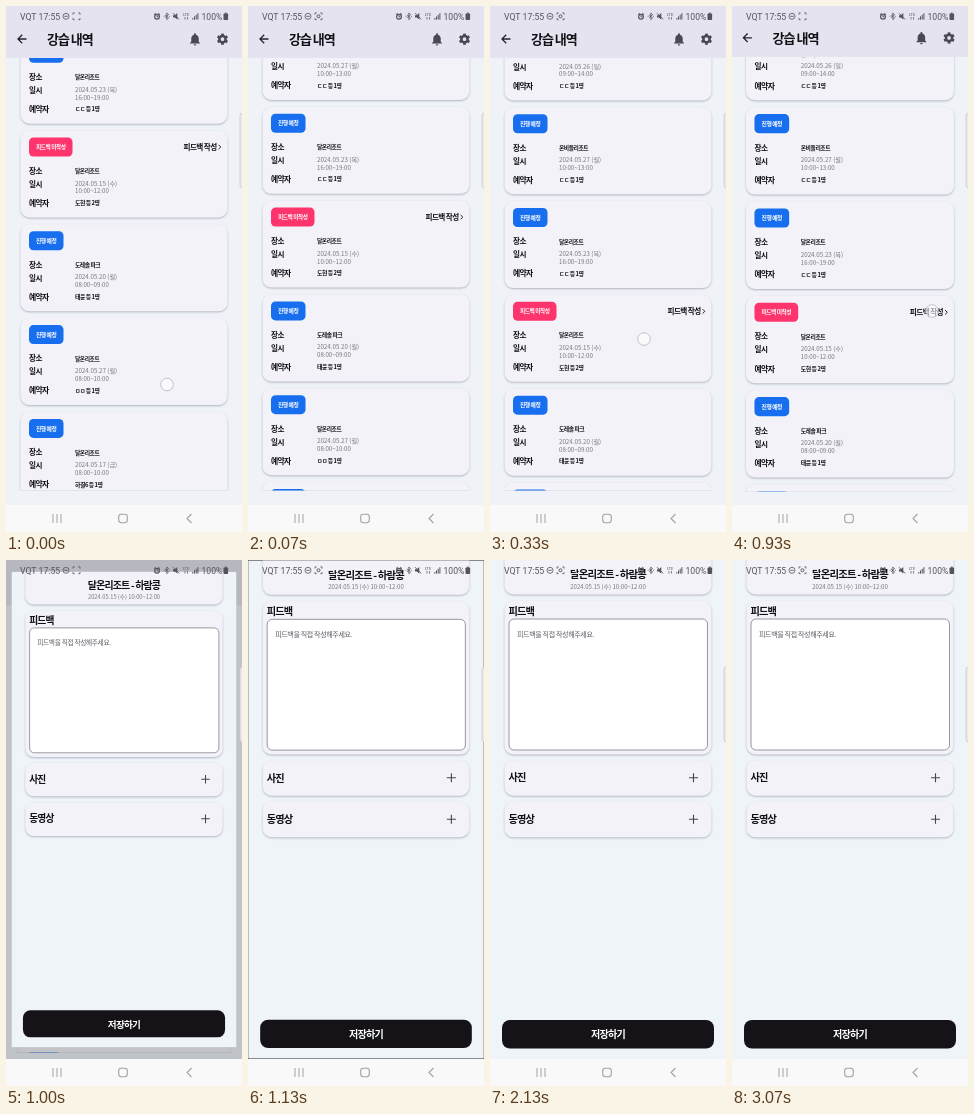
An HTML page with a canvas for the animation above (3190 ms loop, 236x526 px).

```html
<!DOCTYPE html>
<html lang="ko">
<head>
<meta charset="utf-8">
<title>강습 내역</title>
<style>
  html, body { margin: 0; width: 100%; height: 100%; overflow: hidden; background: #eff3f8; }
  canvas { display: block; width: 236px; height: 526px; }
</style>
</head>
<body>
<canvas id="stage"></canvas>
<script>
const W = 236, H = 526, VIEW_H = 499;
const LOOP = 3190, TICK = 1000 / 15;
const OPEN_AT = 917, OPEN_TIME = 300;
const PITCH = 93.8;
const KOREAN = '"Noto Sans CJK KR", "Noto Sans CJK", sans-serif';
const INK = '#111014', ICON = '#4a4852', PAGE = '#eff3f8', CARD = '#f3f2f8';

const lessons = [
  { place: '달온리조트', date: '2024.05.26 (일)', time: '09:00~14:00', who: 'ㄷㄷ 등 1명' },
  { place: '온비들리조트', date: '2024.05.27 (월)', time: '10:00~13:00', who: 'ㄷㄷ 등 1명' },
  { place: '달온리조트', date: '2024.05.23 (목)', time: '16:00~19:00', who: 'ㄷㄷ 등 1명' },
  { place: '달온리조트', date: '2024.05.15 (수)', time: '10:00~12:00', who: '도현 등 2명', feedback: true },
  { place: '도레솔 파크', date: '2024.05.20 (월)', time: '08:00~09:00', who: '태윤 등 1명' },
  { place: '달온리조트', date: '2024.05.27 (월)', time: '08:00~10:00', who: 'ㅁㅁ 등 1명' },
  { place: '달온리조트', date: '2024.05.17 (금)', time: '08:00~10:00', who: '하결6 등 1명' }
];

const canvas = document.getElementById('stage');
const ctx = canvas.getContext('2d');
const dpr = window.devicePixelRatio || 1;
canvas.width = W * dpr;
canvas.height = H * dpr;

const clamp = v => Math.max(0, Math.min(1, v));

function bezier(x1, y1, x2, y2) {
  const at = (a, b, s) => 3 * (1 - s) ** 2 * s * a + 3 * (1 - s) * s * s * b + s ** 3;
  return x => {
    let lo = 0, hi = 1;
    for (let i = 0; i < 24; i++) {
      const mid = (lo + hi) / 2;
      if (at(x1, x2, mid) < x) lo = mid; else hi = mid;
    }
    return at(y1, y2, lo);
  };
}
const launch = bezier(0.05, 0, 0.1333, 0.06);
const settle = bezier(0.2083, 0.82, 0.25, 1);
const zoomEase = u => u < 1 / 6 ? 0.4 * launch(u * 6) : 0.4 + 0.6 * settle((u - 1 / 6) * 1.2);

function text(str, x, y, size, { color = INK, weight = 900, spacing = -0.08, align = 'left', font = KOREAN } = {}) {
  ctx.font = `${weight} ${size}px ${font}`;
  ctx.letterSpacing = `${size * spacing}px`;
  ctx.textAlign = align;
  ctx.fillStyle = color;
  ctx.fillText(str, x, y + size * 0.37);
}

function box(x, y, w, h, r, fill, stroke, width = 1) {
  ctx.beginPath();
  ctx.roundRect(x, y, w, h, r);
  if (fill) { ctx.fillStyle = fill; ctx.fill(); }
  if (stroke) { ctx.strokeStyle = stroke; ctx.lineWidth = width; ctx.stroke(); }
}

// Each argument after width is a polyline: [x, y, x, y, ...]
function lines(color, width, ...paths) {
  ctx.beginPath();
  for (const p of paths)
    for (let i = 0; i < p.length; i += 2) ctx[i ? 'lineTo' : 'moveTo'](p[i], p[i + 1]);
  ctx.strokeStyle = color;
  ctx.lineWidth = width;
  ctx.stroke();
}

function circle(x, y, r, fill, stroke, width = 1) {
  box(x - r, y - r, 2 * r, 2 * r, r, fill, stroke, width);
}

function card(y, h) {
  ctx.save();
  ctx.shadowColor = 'rgba(90, 90, 115, 0.4)';
  ctx.shadowBlur = 2 * dpr;
  ctx.shadowOffsetY = dpr;
  box(14.5, y, 207, h, 9, CARD);
  ctx.restore();
}

function lessonCard(lesson, y) {
  const gray = { color: '#777680', weight: 400, spacing: 0 };
  card(y - 16.5, 87);
  if (lesson.feedback) {
    box(23, y - 9.5, 43.5, 19, 4.5, '#fd356c');
    text('피드백 미작성', 30, y, 5.7, { color: '#fff' });
    text('피드백 작성', 177.5, y, 7.6);
    lines(INK, 0.9, [212.6, y - 2.2, 214.8, y, 212.6, y + 2.2]);
  } else {
    box(23, y - 9.5, 34.5, 19, 4.5, '#176eee');
    text('진행 예정', 30, y, 5.8, { color: '#fff' });
  }
  text('장소', 23, y + 24, 7.6);
  text(lesson.place, 69, y + 24, 5.8);
  text('일시', 23, y + 37, 7.6);
  text(lesson.date, 69, y + 36.3, 6.2, gray);
  text(lesson.time, 69, y + 44.2, 6.1, gray);
  text('예약자', 23, y + 56, 7.8);
  text(lesson.who, 69, y + 56, 5.9);
}

const bell = new Path2D('M12 22c1.1 0 2-.9 2-2h-4c0 1.1.9 2 2 2zm6-6v-5c0-3.1-1.6-5.6-4.5-6.3V4c0-.8-.7-1.5-1.5-1.5s-1.5.7-1.5 1.5v.7C7.6 5.4 6 7.9 6 11v5l-2 2v1h16v-1z');

function header() {
  ctx.fillStyle = '#e4e3ef';
  ctx.fillRect(0, 0, W, 52);
  lines('#25232a', 1.3, [20.5, 33, 12, 33], [16.2, 28.8, 12, 33, 16.2, 37.2]);
  text('강습 내역', 41, 33, 13);

  ctx.save();
  ctx.translate(189 - 12 * 0.62, 33.3 - 12.2 * 0.62);
  ctx.scale(0.62, 0.62);
  ctx.fillStyle = ICON;
  ctx.fill(bell);
  ctx.restore();

  circle(216.5, 33.2, 3.1, null, ICON, 2.5);
  for (let i = 0; i < 6; i++) {
    const a = (i + 0.5) * Math.PI / 3, c = Math.cos(a), s = Math.sin(a);
    lines(ICON, 2.7, [216.5 + 3.4 * c, 33.2 + 3.4 * s, 216.5 + 5.6 * c, 33.2 + 5.6 * s]);
  }
}

function listPage(t) {
  ctx.fillStyle = PAGE;
  ctx.fillRect(0, 0, W, VIEW_H);
  const scroll = 1 - (1 - clamp(t / 396)) ** 3;
  const anchor = 141 + 165 * scroll;
  ctx.save();
  ctx.beginPath();
  ctx.rect(0, 52, W, 432.5);
  ctx.clip();
  lessons.forEach((lesson, i) => lessonCard(lesson, anchor + (i - 3) * PITCH));
  ctx.restore();
  header();
}

function attachRow(label, y) {
  card(y - 17.5, 35.5);
  text(label, 18.5, y, 10.2);
  lines('#45434b', 1.1, [199, y, 208, y], [203.5, y - 4.5, 203.5, y + 4.5]);
}

function feedbackPage() {
  ctx.fillStyle = '#eff4f9';
  ctx.fillRect(0, 0, W, VIEW_H);
  card(-20, 54.5);
  text('달온리조트 - 하람콩', 118, 14.5, 10.4, { align: 'center' });
  text('2024.05.15 (수) 10:00~12:00', 118, 26.5, 6, { color: '#77757e', weight: 500, spacing: 0, align: 'center' });
  card(41, 153.5);
  text('피드백', 18.5, 51, 10.2);
  box(19, 59, 198.5, 131, 5, '#fff', '#8e8c94', 0.9);
  text('피드백을 직접 작성해주세요.', 27, 74, 7, { color: '#5c5a62', weight: 400, spacing: -0.05 });
  attachRow('사진', 217.7);
  attachRow('동영상', 259.3);
  box(12, 460, 212, 28.5, 8, '#151318');
  text('저장하기', 118, 474.5, 10.1, { color: '#fff', align: 'center' });
}

function zoomed(scale, draw) {
  ctx.save();
  ctx.translate(W / 2, VIEW_H / 2);
  ctx.scale(scale, scale);
  ctx.translate(-W / 2, -VIEW_H / 2);
  ctx.beginPath();
  ctx.rect(0, 0, W, VIEW_H);
  ctx.clip();
  draw();
  ctx.restore();
}

function statusBar(t) {
  const color = '#55545b';
  const roman = { color, weight: 400, spacing: 0, font: 'Roboto, sans-serif' };
  text('VQT 17:55', 14, 10.5, 8.7, roman);
  circle(60, 10.3, 3, null, color, 0.8);
  lines(color, 0.9, [58.3, 10.3, 61.7, 10.3]);

  for (const sx of [-1, 1])
    for (const sy of [-1, 1])
      lines(color, 0.8, [70.5 + sx * 1.8, 10.3 + sy * 3.4, 70.5 + sx * 3.5, 10.3 + sy * 3.4, 70.5 + sx * 3.5, 10.3 + sy * 1.7]);
  if ((t + 940) % 1000 < 460) circle(70.5, 10.3, 1.5, null, color, 1);

  circle(151, 10.7, 2.4, null, color, 1.2);
  lines(color, 1, [148, 8.6, 149.8, 7.2], [152.2, 7.2, 154, 8.6], [151, 9.3, 151, 10.8, 152.3, 10.8]);
  lines(color, 0.8, [159, 8.8, 162.6, 12, 160.8, 13.6, 160.8, 7, 162.6, 8.6, 159, 11.8], [157.7, 10.3, 158.6, 10.3], [163, 10.3, 163.9, 10.3]);
  ctx.beginPath();
  ctx.moveTo(167, 9.2); ctx.lineTo(168.8, 9.2); ctx.lineTo(171.3, 7);
  ctx.lineTo(171.3, 13.6); ctx.lineTo(168.8, 11.6); ctx.lineTo(167, 11.6);
  ctx.fillStyle = color;
  ctx.fill();
  lines(color, 0.9, [167, 7.2, 173.2, 13.4]);
  text('LTE', 177, 8.6, 4, roman);
  lines(color, 0.7, [179, 11, 179, 13.6], [181.5, 11, 181.5, 13.6]);
  for (let i = 0; i < 4; i++) lines(color, 1, [186.8 + i * 1.7, 13.6, 186.8 + i * 1.7, 12 - i * 1.6]);
  text('100%', 195.5, 10.5, 8.6, roman);
  box(217.5, 7.4, 4.6, 6.6, 0.8, color);
  box(218.9, 6.6, 1.8, 1.2, 0, color);
}

function navBar() {
  const gray = '#a3a3a6';
  ctx.fillStyle = '#f9f9fa';
  ctx.fillRect(0, VIEW_H, W, H - VIEW_H);
  for (const x of [47, 51, 55]) lines(gray, 1, [x, 508, x, 517]);
  box(112.7, 508.3, 8.6, 8.4, 2.6, null, gray, 1.1);
  lines(gray, 1.1, [185.5, 508, 181, 512.5, 185.5, 517]);
}

function touch(t) {
  let point;
  if (t < 60) point = [161, 378.5];
  else if (t > 180 && t < 480) {
    const drag = clamp((t - 200) / 133);
    point = [155 - drag, 323 + 10 * drag];
  } else if (t > 850 && t < 960) point = [200, 305];
  if (point) circle(...point, 6.3, 'rgba(255, 255, 255, 0.6)', '#bbbac6', 0.9);
}

function render(t) {
  const u = clamp((t - OPEN_AT) / OPEN_TIME);
  const zoom = zoomEase(u);
  ctx.setTransform(dpr, 0, 0, dpr, 0, 0);
  ctx.save();
  ctx.beginPath();
  ctx.rect(0, 0, W, VIEW_H);
  ctx.clip();
  if (u < 1) zoomed(1 + 0.05 * zoom, () => listPage(t));
  ctx.fillStyle = `rgba(0, 0, 0, ${0.6 * clamp((u - 0.2075) / 0.21)})`;
  ctx.fillRect(0, 0, W, VIEW_H);
  if (u > 0.2) zoomed(u < 1 ? 0.85 + 0.15 * zoom : 1, feedbackPage);
  ctx.restore();

  statusBar(t);
  navBar();
  box(234, 107, 8, 75, 2.5, '#e9e9ed', '#c9c9d0', 0.8);
  touch(t);
}

const start = performance.now();
function frame() {
  const t = (performance.now() - start) % LOOP;
  render(Math.floor((t + 4) / TICK) * TICK);
  requestAnimationFrame(frame);
}
frame();
</script>
</body>
</html>
```
